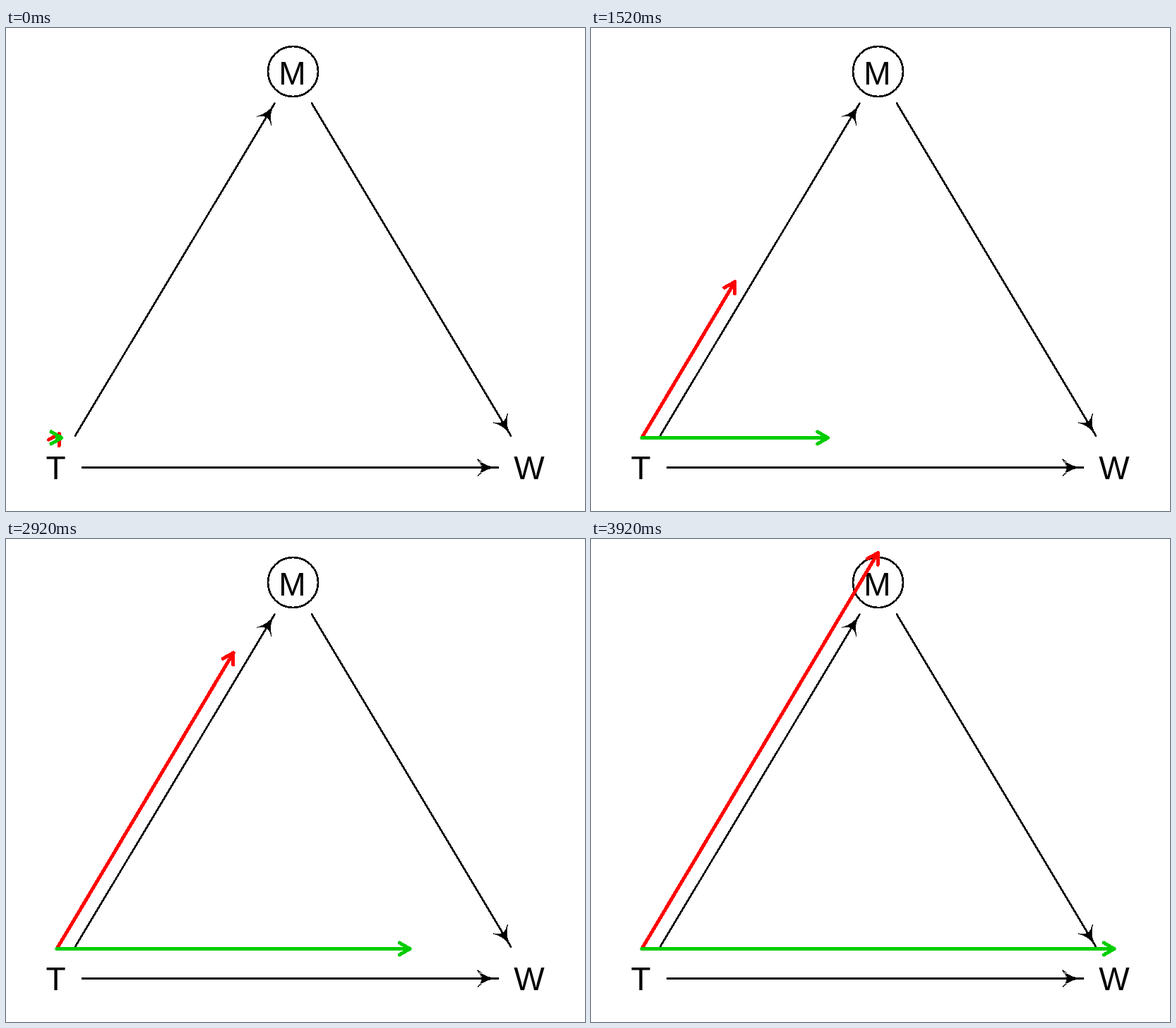
Animation, 820 px wide and 683 px high, one loop 3.96 s. Source, as an HTML page:

```html
<!DOCTYPE html>
<html lang="en">
<head>
<meta charset="utf-8">
<title>Triangle diagram</title>
<style>
  html, body { margin: 0; width: 100%; height: 100%; overflow: hidden; background: #fff; }
  svg { display: block; width: 820px; height: 683px; }
  text { font: 46px Arial, "Liberation Sans", sans-serif; text-anchor: middle; }
  .edge, .grow, circle { fill: none; stroke-linecap: round; stroke-linejoin: round; shape-rendering: crispEdges; }
  .edge, circle { stroke: #000; stroke-width: 2.7; }
  .grow { stroke-width: 5; }
</style>
</head>
<body>
<svg viewBox="0 0 820 683">
  <g id="edges"></g>
  <circle cx="406.5" cy="61.5" r="35.5"/>
  <text x="70.5" y="638">T</text>
  <text x="405.5" y="80">M</text>
  <text x="741" y="638">W</text>
  <path id="red" class="grow" stroke="#f00"/>
  <path id="green" class="grow" stroke="#00cd00"/>
</svg>
<script>
const STEP = 40, COUNT = 99;
const START = [72, 579.5];
const BARB = 17;
const $ = id => document.getElementById(id);

// Black edge with a swept-back head whose sides are circular arcs
function edge(x1, y1, x2, y2) {
  const angle = Math.atan2(y2 - y1, x2 - x1) * 180 / Math.PI;
  return `<path class="edge" d="M${x1} ${y1}L${x2} ${y2}"/>
    <path d="M0 0A41 41 0 0 1 -29 -12Q-16 0 -29 12A41 41 0 0 1 0 0Z"
      stroke="#000" stroke-width="0.8" shape-rendering="crispEdges"
      transform="translate(${x2} ${y2}) rotate(${angle})"/>`;
}

// Open arrow from START, drawn to the given fraction of its full reach
function arrow(dx, dy, part) {
  const x = START[0] + dx * part, y = START[1] + dy * part;
  const a = Math.atan2(dy, dx);
  const barb = turn => `${x - BARB * Math.cos(a + turn)} ${y - BARB * Math.sin(a + turn)}`;
  return `M${START}L${x} ${y}M${barb(Math.PI / 6)}L${x} ${y}L${barb(-Math.PI / 6)}`;
}

function draw(ms) {
  const part = (Math.floor(ms / STEP) % COUNT + 1) / COUNT;
  $('red').setAttribute('d', arrow(334.5, -560, part));
  $('green').setAttribute('d', arrow(669, 0, part));
}

$('edges').innerHTML =
  edge(98, 576.5, 380.5, 106.5) +
  edge(433, 106.5, 715, 576.5) +
  edge(108, 621.5, 696.5, 621.5);

let begin;
function tick(now) {
  begin ??= now;
  draw(now - begin);
  requestAnimationFrame(tick);
}
draw(0);
requestAnimationFrame(tick);
</script>
</body>
</html>
```
